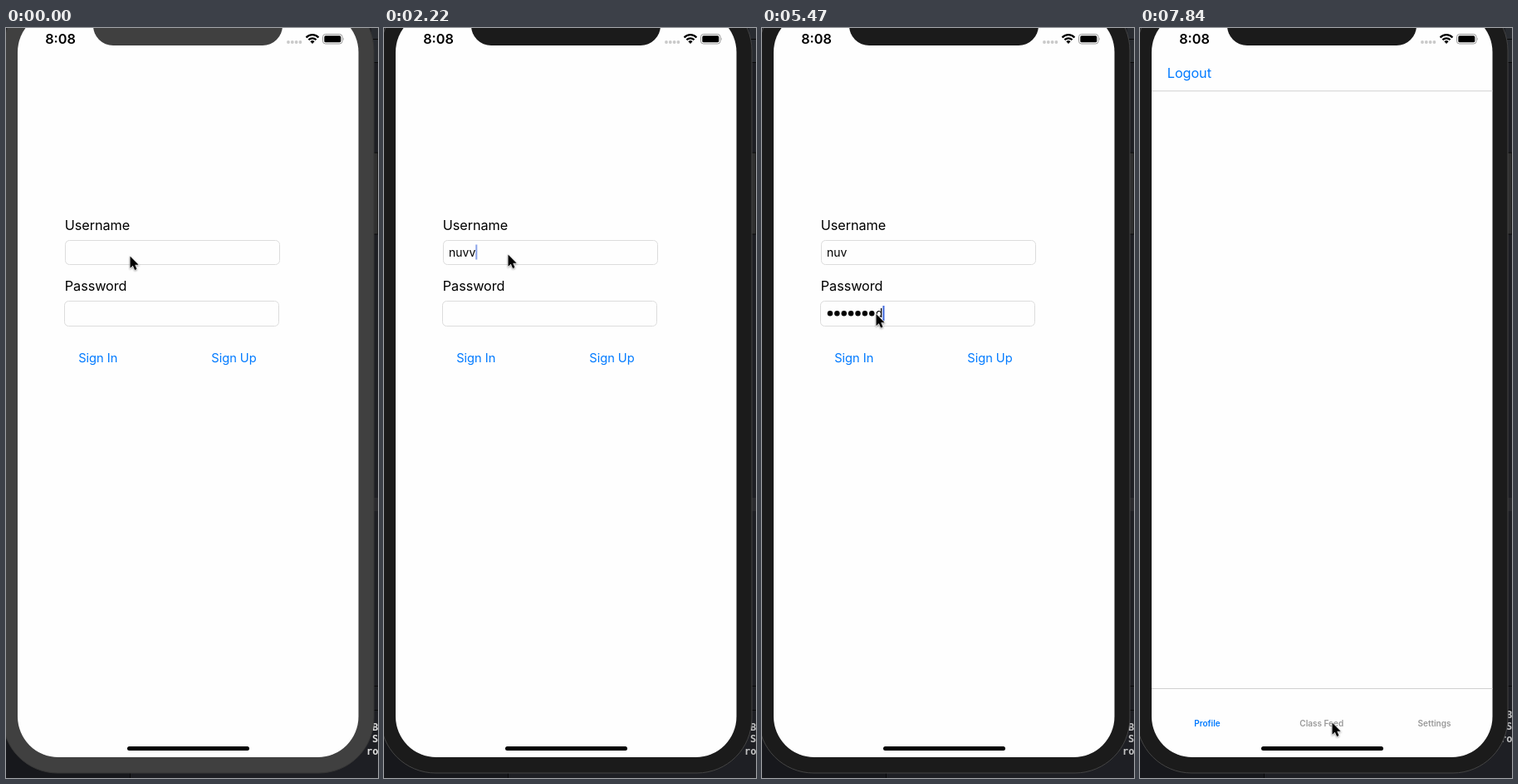
These frames come from a looping animation (448x902 px, 8 s). An HTML page:

```html
<!DOCTYPE html>
<html lang="en">
<head>
<meta charset="utf-8">
<title>Sign in</title>
<style>
  html, body { margin: 0; width: 100%; height: 100%; overflow: hidden; background: #1e1f24; }
  svg { display: block; width: 448px; height: 902px; }
  text { font-family: Inter, sans-serif; white-space: pre; }
  .label { font-size: 16.3px; letter-spacing: -.1px; }
  .button { font-size: 14.7px; letter-spacing: -.05px; }
  .input { font-size: 14px; }
  .tab { font-size: 10px; font-weight: 600; fill: #999; }
  .code text { font: bold 12px "DejaVu Sans Mono", monospace; fill: #ddd; }
  .label.link, .button, .tab.link { fill: #007aff; }
  .field { fill: #fefefe; stroke: #dcdcdc; }
  .rule { stroke: #d0d0d0; }
</style>
</head>
<body>
<svg viewBox="0 0 448 902">
  <defs><clipPath id="screen"><rect x="14" y="-20" width="410.5" height="897" rx="49"/></clipPath></defs>

  <rect width="448" height="902" fill="#1e1f24"/>
  <path d="M0 850H150V902H0Z" fill="#17181c"/>
  <path d="M440 0H448V41H440Z" fill="#292c31"/>
  <path d="M440 150H448V248H440Z" fill="#303030" stroke="#090909"/>
  <path d="M440 565H448V581H440Z" fill="#2a2a2e"/>
  <path d="M440 13.5H448M440 41.5H448M440 791.5H448M440 820.5H448M149.5 896V902" stroke="#090909"/>
  <g id="code" class="code">
    <text x="441" y="845">B</text>
    <text x="441" y="859">S</text>
    <text x="434" y="874">ro</text>
  </g>

  <rect id="body" x="-4" y="-39" width="447" height="935" rx="66"/>
  <g clip-path="url(#screen)">
    <path d="M0-20H448V902H0Z" fill="#fefefe"/>
    <g id="form">
      <text class="label" x="70.8" y="243">Username</text>
      <rect class="field" x="71.5" y="255.5" width="258" height="29" rx="5"/>
      <text class="label" x="70.8" y="316.3">Password</text>
      <rect class="field" x="70.5" y="328.5" width="258" height="30" rx="5"/>
      <text id="user" class="input" x="78" y="275"></text>
      <g id="dots"></g>
      <text id="last" class="input" y="348"></text>
      <rect id="caret" width="2" height="18" fill="#3f68dc"/>
      <text id="signIn" class="button" x="87.2" y="402">Sign In</text>
      <text class="button" x="247.3" y="402">Sign Up</text>
    </g>
    <g id="home">
      <text class="label link" x="32.8" y="60">Logout</text>
      <path class="rule" d="M14 75.8H425M14 794.5H425"/>
      <text class="tab link" x="65.3" y="840">Profile</text>
      <text class="tab" x="192.3" y="840">Class Feed</text>
      <text class="tab" x="334.5" y="840">Settings</text>
    </g>
  </g>

  <rect id="notch" x="105" y="-30" width="228" height="51" rx="24"/>
  <text x="47.2" y="19" font-size="16.3" font-weight="600">8:08</text>
  <path d="M340 17h.01m4.8 0h.01m4.8 0h.01m4.8 0h.01" stroke="#c9c9c9" stroke-width="3.8" stroke-linecap="round"/>
  <g fill="none" stroke="#000" stroke-width="2.3">
    <path d="M361.6 11.4a10 10 0 0 1 14.8 0M364.4 14.3a6.4 6.4 0 0 1 9.2 0"/>
    <path d="M369 19l-2.6-2.7a3.7 3.7 0 0 1 5.2 0Z" fill="#000" stroke="none"/>
  </g>
  <rect x="381.5" y="7.5" width="23.5" height="11.5" rx="3.2" fill="none" stroke="#999"/>
  <rect x="383.3" y="9.3" width="20" height="8" rx="1.6"/>
  <path d="M406.3 11.2q1.8 2 0 4Z" fill="#999"/>
  <rect x="146" y="864" width="147" height="5" rx="2.5"/>
  <path id="pointer" d="M0 0V14.2L3.3 11.2 5.6 16.4 8 15.4 5.8 10.3H10.2Z" stroke="#fff" stroke-width="1.1" paint-order="stroke" style="filter:drop-shadow(0 1px 1px #0006)"/>
</svg>
<script>
const LOOP = 8000, TICK = 147.7, LEAD = 5.4;
const PASSWORD = 'password', DOT = 8.38;

// Edits as [tick, field, text length]; all other times below are ticks too.
const edits = [
  [2, 'user', 0], [8, 'user', 1], [9, 'user', 2], [11, 'user', 4], [17, 'user', 3],
  [24, 'pass', 0], [29, 'pass', 1], [30, 'pass', 2],
  ...[3, 4, 5, 6, 7, 8].map(n => [29 + n, 'pass', n]),
];
const pointerPath = [
  [0, 149.5, 274.5], [1, 149.5, 272.5], [19, 149.5, 272.5], [22, 138.5, 344], [24, 138.5, 344],
  [25, 137.5, 344], [39, 137.5, 344], [44, 94.5, 390.5], [46, 94.5, 390.5],
  [48, 228.5, 642], [53, 231.5, 835.5],
];

const el = Object.fromEntries([...document.querySelectorAll('[id]')].map(e => [e.id, e]));
const set = (e, attrs) => { for (const k in attrs) e.setAttribute(k, attrs[k]); };

for (let i = 0; i < PASSWORD.length - 1; i++) {
  const dot = document.createElementNS('http://www.w3.org/2000/svg', 'circle');
  set(dot, { cx: 82 + i * DOT, cy: 343.3, r: 3.2 });
  el.dots.append(dot);
}

function pointerAt(tick) {
  const next = pointerPath.findIndex(p => p[0] > tick);
  if (next < 0) return pointerPath.at(-1).slice(1);
  const [t0, x0, y0] = pointerPath[next - 1], [t1, x1, y1] = pointerPath[next];
  const u = (tick - t0) / (t1 - t0), e = u * u * (3 - 2 * u);
  return [x0 + (x1 - x0) * e, y0 + (y1 - y0) * e];
}

// Solid after an edit, then fading out and back in.
const caretOpacity = age => ({ 4: .6, 5: 0, 6: 0, 7: .4 })[age] ?? 1;

function drawForm(tick) {
  const done = edits.filter(e => e[0] <= tick);
  const count = field => done.filter(e => e[1] === field).at(-1)?.[2] ?? 0;
  const typed = count('pass'), hidden = typed ? typed - 1 : 0;
  const lastX = 78.2 + hidden * DOT;
  el.user.textContent = 'nuvv'.slice(0, count('user'));
  el.last.textContent = typed ? PASSWORD[hidden] : '';
  set(el.last, { x: lastX });
  [...el.dots.children].forEach((dot, i) => set(dot, { opacity: i < hidden ? 1 : 0 }));

  const [start, field] = done.at(-1) ?? [];
  const inUser = field === 'user', text = inUser ? el.user : el.last;
  set(el.caret, {
    x: (inUser ? 78 : lastX) + (text.textContent ? text.getComputedTextLength() : .4),
    y: inUser ? 260.5 : 334,
    opacity: field ? caretOpacity(tick - start) : 0,
  });
  set(el.signIn, { opacity: tick === 45 ? .35 : 1 });
}

function draw(time) {
  const tick = Math.floor((time % LOOP + LEAD) / TICK);
  const active = tick >= 1, loggedIn = tick >= 48;
  const shell = active ? '#1b1b1b' : '#404040';
  set(el.body, { fill: shell, stroke: active ? '#444' : '#363636' });
  set(el.notch, { fill: shell });
  set(el.code, { transform: `translate(0 ${tick >= 47 ? -15 : 0})`, opacity: active ? .85 : 1 });

  el.form.style.display = loggedIn ? 'none' : '';
  el.home.style.display = loggedIn ? '' : 'none';
  set(el.home, { transform: `translate(0 ${tick === 48 ? 43.8 : 0})` });
  if (!loggedIn) drawForm(tick);
  set(el.pointer, { transform: `translate(${pointerAt(tick)})` });
}

const begin = performance.now();
(function frame() {
  draw(performance.now() - begin);
  requestAnimationFrame(frame);
})();
</script>
</body>
</html>
```
